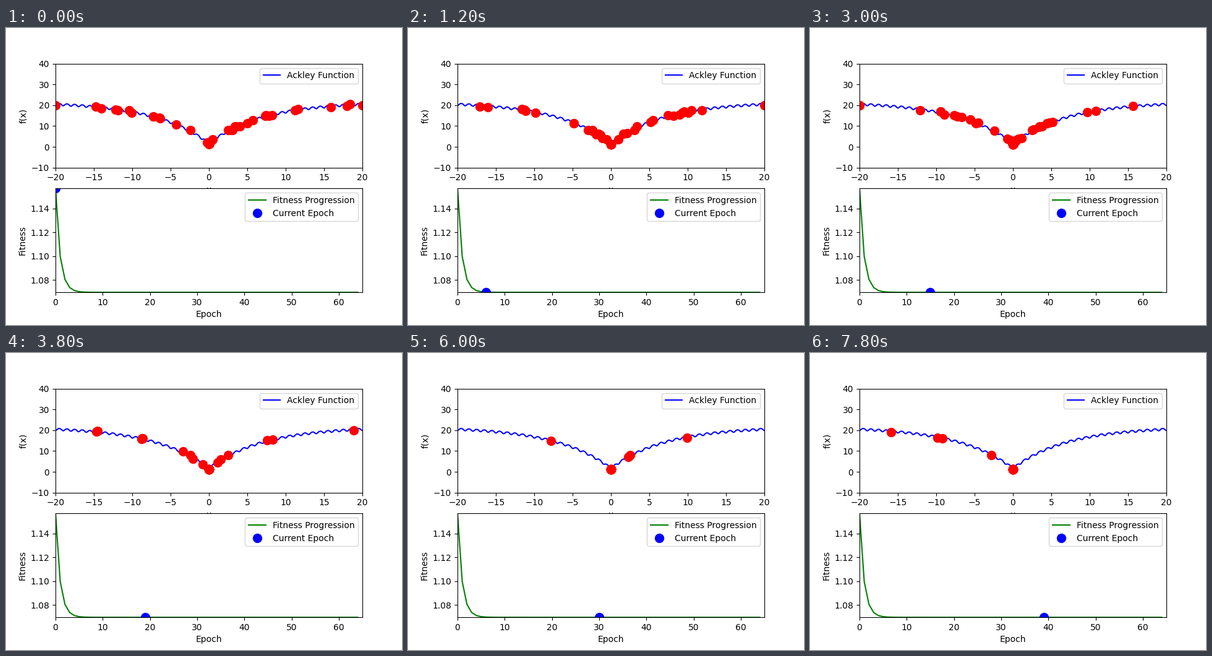
Write a matplotlib script that moves like this. It is 640 by 480 pixels and loops after 8000 ms.

```python
import numpy as np
import matplotlib.pyplot as plt
from matplotlib.animation import FuncAnimation

EPOCHS = 65
FRAMES = 40
LIMIT = 20


def ackley(x):
    bowl = -20 * np.exp(-0.2 * np.sqrt(0.5 * x**2))
    return bowl - np.exp(0.5 * np.cos(2 * np.pi * x)) + 20 + np.e


def population(epoch):
    """Mutants spread over the range, the others settled in the minimum."""
    rng = np.random.default_rng(100 + epoch)
    count = round(4 + 31 / (1 + np.exp(epoch - 18.5)))
    mutants = np.clip(rng.normal(0, 10.5, count), -LIMIT, LIMIT)
    settled = np.zeros(1 + 3 * epoch)
    return np.append(mutants, settled)


# The best solution closes in on zero by a constant factor per epoch.
epochs = np.arange(EPOCHS)
fitness = ackley(0.02685 * 0.375**epochs)

fig, (top, low) = plt.subplots(2, 1, figsize=(6.4, 4.8), dpi=100)

grid = np.linspace(-LIMIT, LIMIT, 400)
top.plot(grid, ackley(grid), "b-", label="Ackley Function")
dots, = top.plot([], [], "ro", markersize=10)
top.set(xlim=(-LIMIT, LIMIT), ylim=(-10, 40), xlabel="x", ylabel="f(x)")
top.legend(loc="upper right")

low.plot(epochs, fitness, "g-", label="Fitness Progression")
now, = low.plot([], [], "bo", markersize=10, label="Current Epoch")
low.set(xlim=(0, EPOCHS), ylim=(fitness.min(), fitness.max()),
        xlabel="Epoch", ylabel="Fitness")
low.legend(loc="upper right")


def update(epoch):
    x = population(epoch)
    dots.set_data(x, ackley(x))
    now.set_data([epoch], [fitness[epoch]])
    return dots, now


anim = FuncAnimation(fig, update, frames=FRAMES, interval=200,
                     init_func=lambda: update(0), repeat=True, repeat_delay=0)
plt.show()
```
